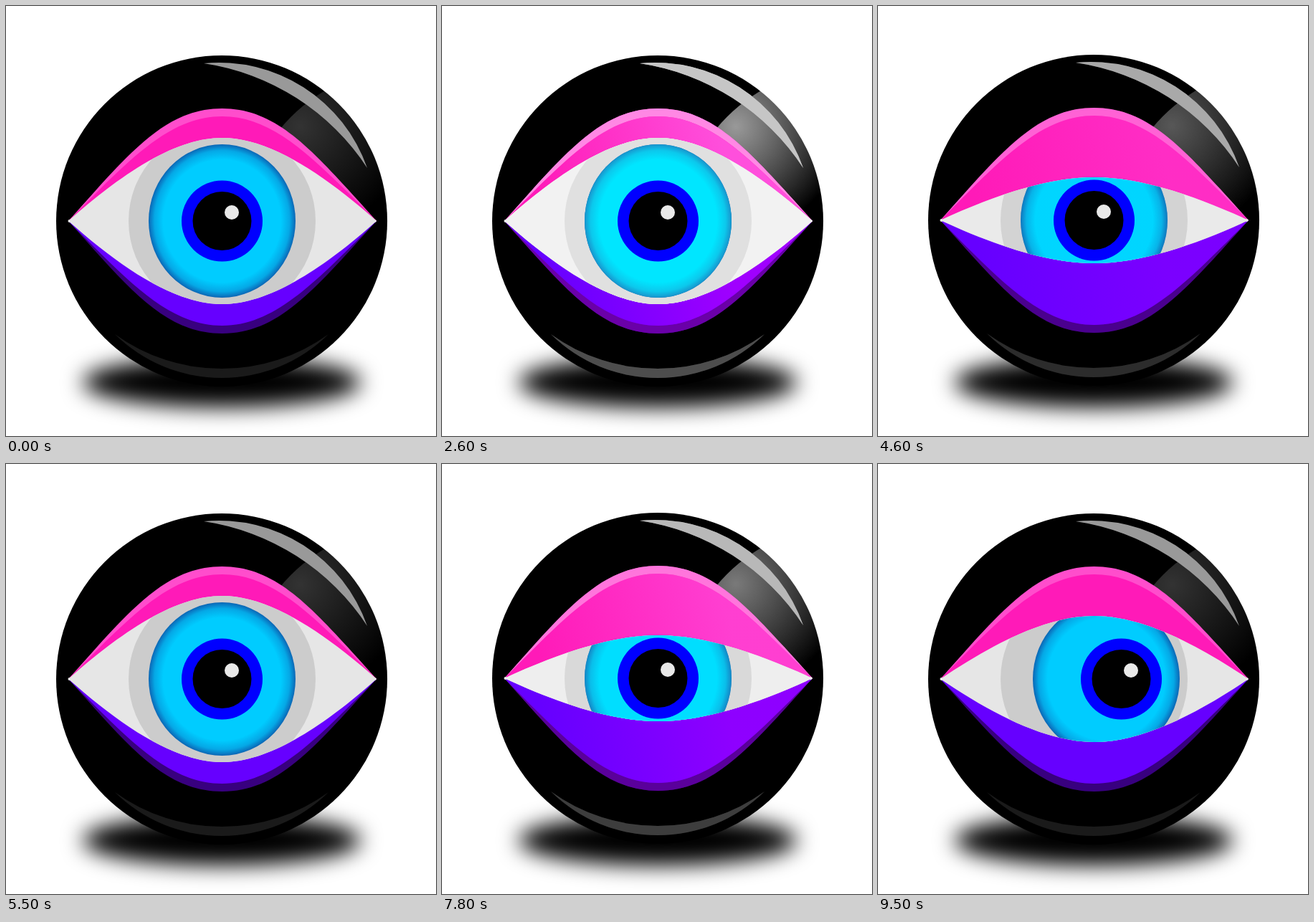
Animation, 600 px wide and 600 px high, one loop 9.7 s. Source, as an HTML page:

```html
<!DOCTYPE html>
<html lang="en">
<head>
<meta charset="utf-8">
<title>Blinking eye button</title>
<style>
  html, body { margin: 0; width: 100%; height: 100%; overflow: hidden; background: #fff; }
  svg { display: block; width: 100vw; height: 100vh; }
  .lit { opacity: var(--light); }
</style>
</head>
<body>
<svg viewBox="0 0 600 600">
  <defs>
    <filter id="blur" x="-30%" y="-100%" width="160%" height="300%">
      <feGaussianBlur stdDeviation="15"/>
    </filter>
    <radialGradient id="glow">
      <stop offset="0" stop-color="#fff" stop-opacity=".5"/>
      <stop offset="1" stop-color="#fff" stop-opacity="0"/>
    </radialGradient>
    <radialGradient id="iris">
      <stop offset=".8" stop-color="#00ccff"/>
      <stop offset=".92" stop-color="#05a8e6"/>
      <stop offset="1" stop-color="#0b66b5"/>
    </radialGradient>
    <radialGradient id="irisLit">
      <stop offset=".8" stop-color="#00e6ff"/>
      <stop offset=".92" stop-color="#0cc8ec"/>
      <stop offset="1" stop-color="#1894cc"/>
    </radialGradient>
    <linearGradient id="pink" gradientUnits="userSpaceOnUse" x1="140" y1="290" x2="400" y2="220">
      <stop offset="0" stop-color="#ff4fdc" stop-opacity="0"/>
      <stop offset="1" stop-color="#ff4fdc"/>
    </linearGradient>
    <linearGradient id="violet" gradientUnits="userSpaceOnUse" x1="150" y1="200" x2="400" y2="250">
      <stop offset="0" stop-color="#a000ff" stop-opacity="0"/>
      <stop offset="1" stop-color="#a000ff"/>
    </linearGradient>
    <clipPath id="slit"><path id="opening"/></clipPath>
    <path id="outer" d="M87 300C172 205 222 143 301.500 143S431 205 517 300Z"/>
    <path id="inner" d="M87 300C172 214 228 154 301.500 154S431 214 517 300Z"/>
    <path id="arc" d="M276 80A219 219 0 0 1 504 226A331 331 0 0 0 276 80Z"/>
    <path id="base" d="M152 458A212.500 212.500 0 0 0 450 458A255 255 0 0 1 152 458Z"/>
  </defs>

  <ellipse cx="301" cy="525" rx="194" ry="35" filter="url(#blur)"/>

  <g id="button">
    <circle cx="301" cy="300" r="231"/>
    <g fill="url(#glow)" clip-path="circle(231px at 301px 300px)">
      <circle cx="410" cy="168" r="150" opacity=".4"/>
      <circle class="lit" cx="410" cy="168" r="150"/>
    </g>
    <use href="#base" fill="#1a1a1a"/>
    <use class="lit" href="#base" fill="#4d4d4d"/>
    <use href="#arc" fill="#999"/>
    <use class="lit" href="#arc" fill="#c6c6c6"/>

    <use href="#outer" fill="#ff4dcc"/>
    <use class="lit" href="#outer" fill="#ff88e4"/>
    <use href="#inner" fill="#ff1ab8"/>
    <use class="lit" href="#inner" fill="url(#pink)"/>
    <g transform="matrix(1 0 0 -1 0 600)">
      <use href="#outer" fill="#38007f"/>
      <use class="lit" href="#outer" fill="#6a00a8"/>
      <use href="#inner" fill="#6600ff"/>
      <use class="lit" href="#inner" fill="url(#violet)"/>
    </g>
    <path d="M87 300H517" stroke="#ffc4f4" stroke-opacity=".6"/>

    <g fill="#e6e6e6">
      <circle cx="88.500" cy="300" r="2"/>
      <circle cx="514.500" cy="300" r="2"/>
    </g>
    <g clip-path="url(#slit)">
      <rect x="80" y="180" width="445" height="240" fill="#e6e6e6"/>
      <circle cx="301.500" cy="300" r="130.500" fill="#ccc"/>
      <g class="lit">
        <rect x="80" y="180" width="445" height="240" fill="#f2f2f2"/>
        <circle cx="301.500" cy="300" r="130.500" fill="#e0e0e0"/>
      </g>
      <g id="eye">
        <ellipse cx="301.500" cy="300" rx="102.500" ry="107" fill="url(#iris)"/>
        <ellipse class="lit" cx="301.500" cy="300" rx="102.500" ry="107" fill="url(#irisLit)"/>
      </g>
      <g id="pupil">
        <circle cx="301.500" cy="300" r="56.500" fill="#00f"/>
        <circle cx="301.500" cy="300" r="41"/>
      </g>
      <circle id="glint" cx="315" cy="288" r="10" fill="#e9e9e9"/>
    </g>
  </g>
</svg>
<script>
  const LOOP = 9700, STEP = 100, BLINK = 300;
  const blinks = [300, 1400, 2900, 6000, 8600];
  const $ = id => document.getElementById(id);

  // Rises from 0 to 1 after `from`, falls back to 0 by `to`.
  const swell = (t, from, to, rise, fall = rise) =>
    Math.max(0, Math.min(1, (t - from) / rise, (to - t) / fall));

  const shift = (id, x, y = 0) => $(id).setAttribute('transform', `translate(${x} ${y})`);

  function slit(h) {
    const half = s => {
      const bend = 300 + s * h * .56, peak = 300 + s * h;
      return `M87 300C160 ${bend} 235 ${peak} 301.5 ${peak}S444 ${bend} 517 300Z`;
    };
    return half(-1) + half(1);
  }

  function draw(t) {
    const shut = Math.max(...blinks.map(c => swell(t, c - BLINK, c + BLINK, BLINK)));
    const squint = swell(t, 3100, 5500, 800) + swell(t, 6000, 9900, 800);
    const light = swell(t, 0, 5500, 1300, 2500) + swell(t, 6000, 9500, 2600, 900);
    const gaze = swell(t, 8600, 9900, 400) - swell(t, 6200, 7800, 400);

    document.documentElement.style.setProperty('--light', light);
    $('opening').setAttribute('d', slit((116 - 56 * squint) * (1 - shut)));
    shift('button', Math.floor(shut), -Math.floor(squint * (1 - shut)));
    shift('eye', gaze * 17);
    shift('pupil', gaze * 38);
    shift('glint', gaze * (gaze < 0 ? 33 : 38));
  }

  function tick() {
    const t = performance.now() % LOOP;
    draw(t - t % STEP);
    requestAnimationFrame(tick);
  }
  tick();
</script>
</body>
</html>
```
